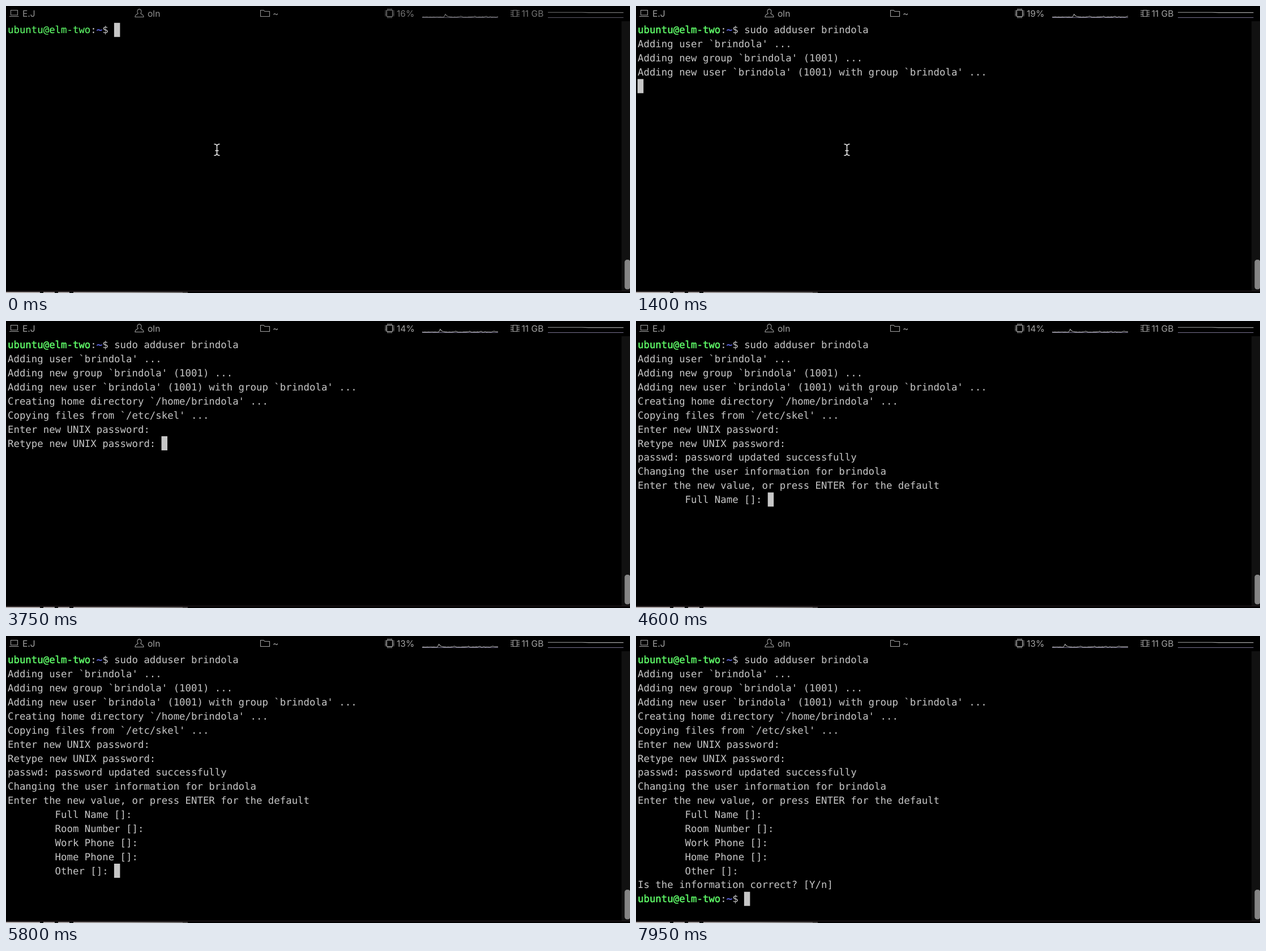
Recreate the animation shown at these times as an HTML page. Size 1102 by 508 pixels, loop 8000 ms.

```html
<!DOCTYPE html>
<html lang="en">
<head>
<meta charset="utf-8">
<title>Adding a user</title>
<style>
  html, body { margin: 0; width: 100%; height: 100%; overflow: hidden; background: #000; }
  svg { display: block; width: 1102px; height: 508px; text-rendering: geometricPrecision; }
  .bar { color: #a3a3a3; }
  .bar text { font: 15.6px Inter, "Liberation Sans", sans-serif; fill: currentColor; }
  .icon, .graph { fill: none; stroke: currentColor; stroke-width: 1.1; }
  .floor { stroke: #77718f; stroke-width: 1; }
  .term text { font: 17.366px "DejaVu Sans Mono", "Noto Sans Mono", monospace; fill: #c7c7c7; white-space: pre; }
  .term .host { fill: #5ffa68; stroke: #5ffa68; stroke-width: .5; }
  .term .dir { fill: #6871ff; stroke: #6871ff; stroke-width: .3; }
  .idle .bar { color: #929292; }
  .idle .meters { color: #747474; }
  .idle .floor { stroke: #5d5a68; }
  .idle .term .host { stroke-width: .15; }
</style>
</head>
<body>
<svg id="stage" viewBox="0 0 1102 508" xmlns="http://www.w3.org/2000/svg">
  <defs>
    <linearGradient id="strip">
      <stop offset="0" stop-color="#b5adad"/>
      <stop offset=".7" stop-color="#8f8a8a"/>
      <stop offset="1" stop-color="#6d6969"/>
    </linearGradient>
  </defs>
  <rect width="1102" height="508"/>
  <rect x="1087" y="27" width="15" height="477" fill="#111"/>
  <rect x="1092.5" y="449" width="10" height="52.500" rx="4.5" fill="#858585"/>
  <rect y="504" width="1102" height="1" fill="#2b2024"/>
  <rect y="506" width="312" height="2" fill="url(#strip)"/>
  <rect x="312" y="506" width="9" height="2" fill="#4a4747"/>
  <path d="M60 507h6M86 507h6M112 507h7" stroke="#151515" stroke-width="2"/>

  <g class="bar">
    <path class="icon" d="M8.500 7.500h12v8.500h-12zM6 18.500h16.500"/>
    <text x="29" y="18.800">E.J</text>
    <path class="icon" d="M235.500 5.500a3.900 4.300 0 0 1 2.300 7.500c0 1.500 5.200 1.600 5.200 6.500h-15c0-4.900 5.200-5 5.200-6.500a3.900 4.300 0 0 1 2.300-7.500z"/>
    <text x="250" y="18.800">oln</text>
    <path class="icon" d="M449.500 18.500v-11h5.500l1.800 2h8.700v9z"/>
    <text x="471" y="18.800">~</text>
  </g>
  <g class="bar meters">
    <path class="icon" d="M672.500 7.500h10v11h-10zM669 9h3.500M669 11.700h3.500M669 14.400h3.500M669 17h3.500M682.500 9h3.500M682.500 11.700h3.500M682.500 14.400h3.500M682.500 17h3.500M674 4.500v3M676.400 4.500v3M678.800 4.500v3M681 4.500v3M674 18.500v3M676.400 18.500v3M678.800 18.500v3M681 18.500v3"/>
    <text id="load" x="690" y="18.800"></text>
    <path class="floor" d="M735 20.500h134"/>
    <polyline class="graph" id="cpu"/>
    <path class="icon" d="M895.500 7.500h7v11h-7zM891 8h4.500M891 11.300h4.500M891 14.600h4.500M891 18h4.500M902.500 8h4.500M902.500 11.300h4.500M902.500 14.600h4.500M902.500 18h4.500"/>
    <text x="910.500" y="18.800">11 GB</text>
    <path class="floor" d="M957 20.500h133.500"/>
    <path class="graph" d="M957 11.300h60l12 .3h61.500"/>
  </g>

  <g class="term" id="term"></g>
  <rect id="caret" width="10.500" height="25" fill="#c7c7c7"/>
  <g id="beam" fill="none" stroke-linecap="round">
    <path id="ibar" d="M368 244.500q4.500 0 4.500 4v12q0 4-4.500 4M377 244.500q-4.500 0-4.500 4v12q0 4 4.500 4M370 256h5" stroke="#e8e8e8" stroke-width="1.600"/>
  </g>
</svg>
<script>
const LOOP = 8000, CELL = 10.455, ROW = 24.88, LEFT = 3;
const USER = "brindola", HOST = "ubuntu@elm-two", PROMPT = HOST + ":~$ ";
const TAB = " ".repeat(8);
const BEAM_HIDES = 2200, FOCUS = 100;

// [time, row, text]: the row takes this text, and the caret goes to its end
const events = [
  [0, 0, PROMPT],
  [400, 0, PROMPT + "sudo adduser " + USER],
  [550, 1, ""],
  [700, 1, "Adding user `" + USER + "' ..."],
  [700, 2, "Adding new group `" + USER + "' (1001) ..."],
  [1050, 3, "Adding new user `" + USER + "' (1001) with group `" + USER + "' ..."],
  [1050, 4, ""],
  [1800, 4, "Creating home directory `/home/" + USER + "' ..."],
  [1800, 5, "Copying files from `/etc/skel' ..."],
  [1850, 6, "Enter new UNIX password: "],
  [3100, 7, "Retype new UNIX password: "],
  [4200, 8, "passwd: password updated successfully"],
  [4200, 9, "Changing the user information for " + USER],
  [4200, 10, "Enter the new value, or press ENTER for the default"],
  [4200, 11, TAB + "Full Name []: "],
  [4850, 12, TAB + "Room Number []: "],
  [5100, 13, TAB + "Work Phone []: "],
  [5350, 14, TAB + "Home Phone []: "],
  [5600, 15, TAB + "Other []: "],
  [6200, 16, "Is the information correct? [Y/n] "],
  [7200, 17, PROMPT]
];

const $ = id => document.getElementById(id);
const load = [16, 19, 14, 13, 14, 13, 13, 13, 13];
const bumps = { 17: 12, 18: 44, 19: 25, 20: 16, 21: 13, 29: 14, 30: 19, 31: 14, 40: 12, 41: 18, 42: 10, 49: 15, 50: 17, 53: 15 };

function sample(i) {
  if (i > 58) return load[i - 59];
  return bumps[i] || 9 + 1.5 * Math.sin(i * 2.3) + Math.sin(i * 0.7);
}

function drawLoad(t) {
  const step = t < 520 ? 0 : Math.floor((t - 520) / 1060) + 1;
  const points = Array.from({ length: 60 }, (_, i) =>
    (735 + i * 134 / 59).toFixed(1) + "," + (20.7 - 0.14 * sample(i + step)).toFixed(2));
  $("cpu").setAttribute("points", points.join(" "));
  $("load").textContent = load[step] + "%";
}

const rows = Array.from({ length: 18 }, (_, i) => {
  const el = document.createElementNS("http://www.w3.org/2000/svg", "text");
  el.setAttribute("x", LEFT);
  el.setAttribute("y", 48.4 + i * ROW);
  return $("term").appendChild(el);
});

function markup(text) {
  if (!text.startsWith(PROMPT)) return text;
  return `<tspan class="host">${HOST}</tspan>:<tspan class="dir">~</tspan>` + text.slice(HOST.length + 2);
}

function drawTerm(t) {
  const shown = events.filter(e => e[0] <= t);
  const texts = rows.map(() => "");
  for (const [, row, text] of shown) texts[row] = text;
  rows.forEach((el, i) => {
    if (el.dataset.text === texts[i]) return;
    el.dataset.text = texts[i];
    el.innerHTML = markup(texts[i]);
  });
  const [, row, text] = shown[shown.length - 1];
  $("caret").setAttribute("x", LEFT - 0.3 + text.length * CELL);
  $("caret").setAttribute("y", 29.8 + row * ROW);
}

function frame() {
  const t = performance.now() % LOOP;
  $("stage").classList.toggle("idle", t < FOCUS);
  $("beam").style.visibility = t < BEAM_HIDES ? "visible" : "hidden";
  drawLoad(t);
  drawTerm(t);
  requestAnimationFrame(frame);
}
frame();
</script>
</body>
</html>
```
